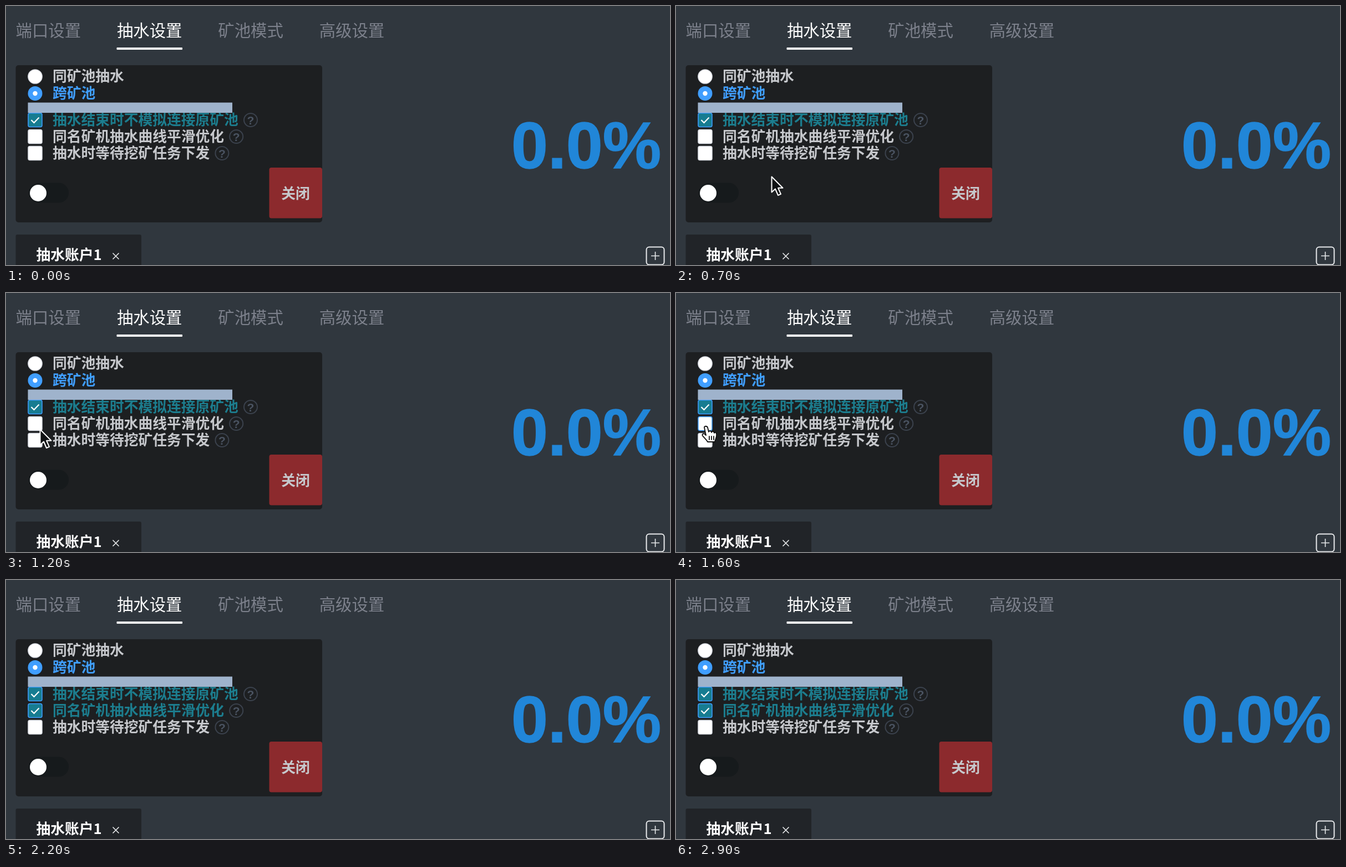
An HTML page that plays this animation: 1197x468 px, repeating every 3000 ms.

```html
<!DOCTYPE html>
<html lang="zh-CN">
<head>
<meta charset="utf-8">
<style>
html, body { margin: 0; width: 100%; height: 100%; overflow: hidden; background: #30373e; }
svg { display: block; width: 1197px; height: 468px; }
text { font: 700 25.75px "Noto Sans CJK SC", "Noto Sans CJK", sans-serif; fill: #c6c8cc; }
.tab { font-size: 29.4px; font-weight: 400; fill: #7c808b; }
.tab.active { font-weight: 500; fill: #fff; }
.blue { fill: #409eff; }
.box { fill: #fff; stroke: #dcdfe6; stroke-width: 1.5; }
.hover .box { stroke: #409eff; }
.on .box { fill: #177c91; stroke: #409eff; }
.teal .label { fill: #1c7d8e; }
.tick { fill: none; stroke: #fff; stroke-width: 2.2; visibility: hidden; }
.on .tick { visibility: visible; }
.help circle { fill: none; stroke: #3b424d; stroke-width: 2; }
.help text { font: 700 21px "Liberation Sans", Arial, sans-serif; fill: #4a5361; text-anchor: middle; }
.rate { font: 700 118.5px "Liberation Sans", Arial, sans-serif; fill: #2186d8; stroke: #2186d8; stroke-width: 1.5; }
.line { fill: none; stroke: #e8eaec; stroke-width: 1.6; }
</style>
</head>
<body>
<svg viewBox="0 0 1197 468">
  <rect width="1197" height="468" fill="#30373e"/>
  <g id="tabs"></g>
  <rect x="199.500" y="75" width="118.500" height="4" rx="1" fill="#fff"/>

  <rect x="17.5" y="107" width="552.5" height="284" rx="5" fill="#1d1f21"/>
  <circle cx="52.5" cy="127.5" r="12.6" class="box"/>
  <text x="84" y="136">同矿池抽水</text>
  <circle cx="52.5" cy="158" r="13" class="blue"/>
  <circle cx="52.5" cy="158" r="4.2" fill="#fff"/>
  <text x="84" y="166.500" class="blue">跨矿池</text>
  <g id="options"></g>
  <rect x="39.500" y="174.500" width="368.500" height="18.500" fill="#9fb3cc"/>

  <rect x="41" y="319.5" width="72" height="36" rx="18" fill="#161a1c"/>
  <circle cx="58" cy="338" r="15" fill="#fff"/>
  <rect x="474.500" y="292" width="95.500" height="91.500" rx="4" fill="#8c2a2d"/>
  <text x="522" y="347.5" text-anchor="middle">关闭</text>

  <path d="M17.5 468V416q0-3 3-3H241q3 0 3 3V468z" fill="#212428"/>
  <text x="54.500" y="459" style="fill:#fff">抽水账户1</text>
  <path d="M192.500 446.500l11 11m0-11l-11 11" class="line"/>
  <rect x="1154.500" y="435.500" width="32" height="32" rx="5" class="line" style="stroke-width:2"/>
  <path d="M1163 451.500h15m-7.500-7.500v15" class="line"/>

  <text x="911" y="292.500" class="rate">0.0%</text>

  <path id="arrow" d="M0 0V28L6.500 22L11.500 33.500L16.500 31.300L11.600 20.300H20Z"
    fill="#101214" stroke="#fff" stroke-width="2" stroke-linejoin="round"/>
  <g id="hand" stroke="#111" stroke-width="1.8" stroke-linejoin="round" stroke-linecap="round">
    <path fill="#fff" d="M-2 2C-2-1 3-1 4 2L6 10C7 7 11 8 11 11C12 8 16 9 16 12C17 10 20 11 20 14
      C21 19 18 22 17 28H4C2 24-2 21-5 17C-7 14-3 12-1 14L1 16Z"/>
    <path fill="none" d="M7 18v6m4-6v6m4-6v6"/>
  </g>
</svg>
<script>
const $ = id => document.getElementById(id);

$('tabs').innerHTML = ['端口设置', '抽水设置', '矿池模式', '高级设置'].map((name, i) =>
  `<text class="tab${i === 1 ? ' active' : ''}" x="${17.5 + i * 182.4}" y="54.500">${name}</text>`).join('');

$('options').innerHTML = ['抽水结束时不模拟连接原矿池', '同名矿机抽水曲线平滑优化', '抽水时等待挖矿任务下发'].map((name, i) =>
  `<g id="option${i}" transform="translate(0 ${206 + i * 30})">
    <rect class="box" x="40" y="-12.500" width="25" height="25" rx="3"/>
    <path class="tick" d="M45.500 0l5 5l9-9.500"/>
    <text class="label" x="84" y="9">${name}</text>
    <g class="help" transform="translate(${441 - i * 25.8})"><circle r="12"/><text y="7.500">?</text></g>
  </g>`).join('');
$('option0').classList.add('on', 'teal');

// Pointer path: time in ms, x, y
const path = [[300, 245, 470], [700, 172.5, 308.5], [1200, 61.5, 246.5], [1300, 55, 242], [1600, 53, 241], [1900, 49, 241], [2200, 49, 241]];

function pointerAt(t) {
  const i = path.findIndex(p => p[0] > t);
  const [t0, x0, y0] = path[i - 1], [t1, x1, y1] = path[i];
  const k = (t - t0) / (t1 - t0);
  return [x0 + (x1 - x0) * k, y0 + (y1 - y0) * k];
}

function place(id, visible, [x, y]) {
  $(id).style.visibility = visible ? 'visible' : 'hidden';
  $(id).setAttribute('transform', `translate(${x} ${y})`);
}

function draw(now) {
  const t = Math.floor(now % 3000 / 100) * 100;
  const shown = t >= 300 && t < 2200;
  const pos = shown ? pointerAt(t) : [0, 0];
  place('arrow', shown && t < 1300, pos);
  place('hand', shown && t >= 1300, pos);
  const row = $('option1').classList;
  row.toggle('hover', t >= 1300);
  row.toggle('teal', t >= 1900);
  row.toggle('on', t >= 2000);
  requestAnimationFrame(draw);
}
draw(performance.now());
</script>
</body>
</html>
```
